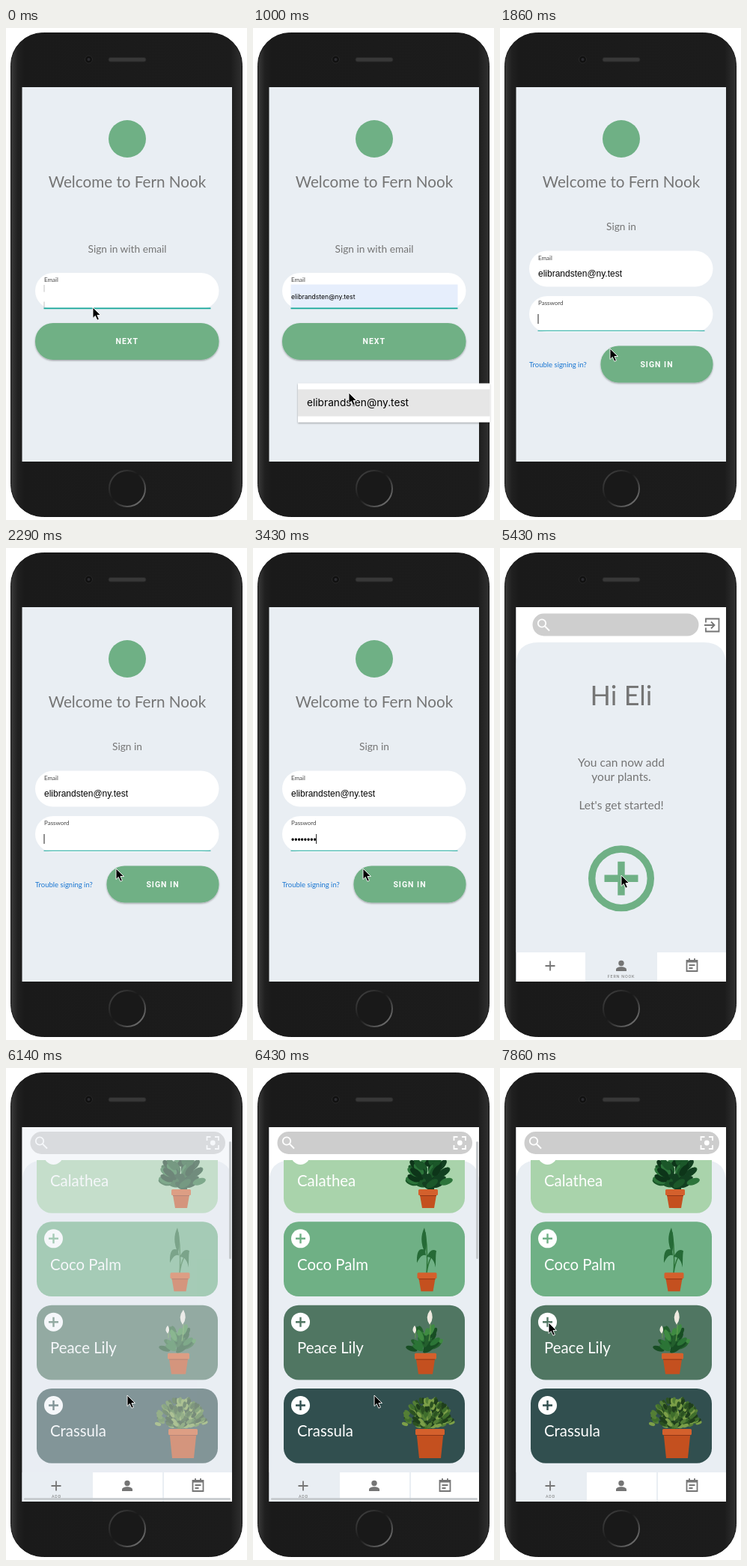
Animation of 322 by 657 pixels, one loop 8000 ms. Source, as an HTML page:

```html
<!DOCTYPE html>
<html lang="en">
<head>
<meta charset="utf-8">
<title>Plant app walkthrough</title>
<style>
  html, body { margin: 0; width: 100%; height: 100%; overflow: hidden; background: #fff; }
  svg { display: block; width: 100%; height: 100%; }
  text { font-family: Lato, sans-serif; fill: #757575; }
  .mid { text-anchor: middle; }
  .title { font-size: 20.7px; }
  .sub { font-size: 13.7px; }
  .body { font-size: 15.6px; }
  .label { font-size: 8px; fill: #444; }
  .tab { font: 5.4px Roboto, sans-serif; letter-spacing: .8px; }
  .button { font: bold 10.5px Roboto, sans-serif; letter-spacing: 1px; fill: #fff; }
  .input { font: 12px "Liberation Sans", sans-serif; fill: #000; }
  .preview { font: 8.6px Inter, sans-serif; fill: #000; }
  .option { font: 13.7px Inter, sans-serif; fill: #000; }
  .card { font-size: 20.4px; fill: #fff; }
  .icon { fill: none; stroke: #757575; stroke-width: 1.8; }
  .white { stroke: #fff; }
</style>
</head>
<body>
<svg viewBox="0 0 322 657">
  <defs>
    <linearGradient id="shell">
      <stop offset="0" stop-color="#3a3a3a"/>
      <stop offset=".03" stop-color="#202020"/>
      <stop offset=".06" stop-color="#1a1a1a"/>
      <stop offset=".95" stop-color="#1c1c1c"/>
      <stop offset="1" stop-color="#303030"/>
    </linearGradient>
    <linearGradient id="ring" x1="0" y1="0" x2="1" y2="1">
      <stop offset="0" stop-color="#4a4a4a"/>
      <stop offset=".45" stop-color="#191919"/>
      <stop offset="1" stop-color="#858585"/>
    </linearGradient>
    <filter id="shadow" x="-10%" y="-20%" width="120%" height="150%">
      <feDropShadow dx="0" dy="1.2" stdDeviation="1.2" flood-opacity=".35"/>
    </filter>
    <clipPath id="screen"><path d="M21.5 79H302V579H21.5Z"/></clipPath>
    <clipPath id="scroller"><path d="M21.5 123H302V540H21.5Z"/></clipPath>
  </defs>
  <rect x="6.5" y="6.5" width="309" height="646" rx="43" fill="url(#shell)" stroke="#151515"/>
  <circle cx="110.5" cy="42" r="5" fill="#111" stroke="#292929"/>
  <circle cx="110.5" cy="42" r="2" fill="#2c2c30"/>
  <rect x="137" y="39.5" width="50" height="5.5" rx="2.7" fill="#383838" stroke="#292929"/>
  <circle cx="162" cy="615" r="24" fill="#191919" stroke="url(#ring)" stroke-width="2"/>
  <g clip-path="url(#screen)">
    <path d="M21 79H302V579H21Z" fill="#e9eef3"/>
    <g id="scenes"></g>
  </g>
  <g id="dropdown">
    <path d="M60 474.5H316.5V526.5H60Z" fill="#fff" filter="url(#shadow)"/>
    <path id="hover" d="M60 482.5H316.5V518.5H60Z" fill="#e6e6e6"/>
    <text id="option" class="option" x="72" y="505"></text>
  </g>
  <path id="cursor" d="M0 0V14.5L3.3 11.4L5.9 17.2L8.4 16.1L5.9 10.5H10.5Z" stroke="#fff" stroke-width=".9"/>
</svg>
<script>
const LOOP = 8000;
const EMAIL = 'elibrandsten@ny.test';
const APP = 'Fern Nook';
const GREEN = '#6fb085';
const $ = id => document.getElementById(id);

let seed = 7;
const random = () => (seed = seed * 16807 % 2147483647) / 2147483647;

const text = (cls, x, y, content, extra = '') => `<text class="${cls}" x="${x}" y="${y}" ${extra}>${content}</text>`;
const rect = (x, y, w, h, r, fill, extra = '') =>
  `<rect x="${x}" y="${y}" width="${w}" height="${h}" rx="${r}" fill="${fill}" ${extra}/>`;
const icon = (d, cls = '', extra = '') => `<path class="icon ${cls}" d="${d}" ${extra}/>`;
const plus = (x, y, r, extra = '') => icon(`M${x - r} ${y}h${2 * r}M${x} ${y - r}v${2 * r}`, '', extra);
const scene = (id, content) => `<g id="${id}">${content}</g>`;

const button = (x, y, w, label) => rect(x, y, w, 49, 24, GREEN, 'filter="url(#shadow)"')
  + text('button mid', x + w / 2, y + 28, label);
const field = (y, label) => rect(39, y, 245.5, 48, 24, '#fff') + text('label', 51, y + 12, label);
const magnifier = (x, y) => icon(`M${x + 3} ${y + 3}l6 6`, 'white', 'stroke-width="2.2"')
  + `<circle class="icon white" cx="${x - 1}" cy="${y - 1}" r="5.2"/>`;

const header = `<circle cx="162" cy="148" r="25" fill="${GREEN}"/>` + text('title mid', 162, 213, `Welcome to ${APP}`);

function tabs(active) {
  const edges = active ? [22, 114, 210, 302] : [22, 116, 211, 302];
  let out = '<path d="M21 540H302V579H21Z" fill="#e9eef3"/>';
  for (let i = 0; i < 3; i++)
    if (i !== active) out += rect(edges[i], 540, edges[i + 1] - edges[i] - (active || i > 1 ? 0 : 2), 39, 0, '#fff');
  return out + plus(67, 558, 6.5)
    + '<path d="M155 565v-2c0-5 14-5 14 0v2Z" fill="#757575"/><circle cx="162" cy="554.5" r="3.7" fill="#757575"/>'
    + icon('M249.5 551h14v14h-14ZM249 552.5h15M253 548v3M260 548v3M252.5 557h8M252.5 561h5')
    + text('tab mid', active ? 162 : 67.5, 574, active ? APP.toUpperCase() : 'ADD');
}

// Scatters leaves in a half-ellipse above the base, each pointing outwards.
function foliage(x, y, count, spread, height, w, h, colors) {
  let out = '';
  for (let i = 0; i < count; i++) {
    const angle = (random() - .5) * 2.9, r = Math.sqrt(random());
    const cx = x + Math.sin(angle) * r * spread, cy = y - Math.cos(angle) * r * height;
    out += `<ellipse rx="${w}" ry="${h}" fill="${colors[i % colors.length]}"
      transform="translate(${cx} ${cy}) rotate(${angle * 50})"/>`;
  }
  return out;
}

const pot = (x, rim, half, bottom) =>
  `<path d="M${x - half + 1.5} ${rim + 5}H${x + half - 1.5}L${x + half - 5} ${bottom}H${x - half + 5}Z" fill="#c4501f"/>`
  + rect(x - half, rim, half * 2, 8, 1.5, '#d4602c')
  + `<path d="M${x - half + 2} ${rim + 8.5}H${x + half - 2}" stroke="#8f3515"/>`;

const palm = '<g fill="none" stroke="#2c7439" stroke-width="1.5"><path d="M232 70Q234 40 230 14M232 68Q235 48 243 40"/></g>'
  + '<g fill="#256a36"><path d="M229 8Q221 24 230 42Q234 24 229 8ZM230 38Q218 32 219 55Q225 42 231 45Z'
  + 'M232 47Q238 34 245 39Q244 43 244 61Q241 46 232 47Z"/></g>';
const lily = foliage(230, 62, 34, 19, 34, 3.3, 8, ['#174d23', '#2b7436', '#3f8b42', '#235f2d'])
  + '<path d="M235 48Q238 35 237 25M217 44V36" stroke="#66a04f" fill="none"/>'
  + '<path d="M237 6Q229 16 236 26Q243 17 237 6ZM216 27Q211 33 216 38Q220 33 216 27Z" fill="#eee9df"/>';

const plants = [
  { name: 'Calathea', y: 94, color: '#a9d3ab',
    art: foliage(235, 64, 42, 24, 46, 4.3, 9, ['#0d3519', '#1b5729', '#123f20', '#2c743a']) + pot(234, 68, 13, 93) },
  { name: 'Coco Palm', y: 205.3, color: GREEN, art: palm + pot(232.5, 68, 13, 93) },
  { name: 'Peace Lily', y: 316.7, color: '#507662', art: lily + pot(230.5, 64, 14.5, 92) },
  { name: 'Crassula', y: 428, color: '#314f4f',
    art: foliage(233, 52, 190, 33, 39, 2.3, 4.3, ['#2c5221', '#547f35', '#7c9f48', '#1f3f1b', '#3f6e2c'])
      + pot(236.5, 54, 19.5, 93) },
];

const card = ({ name, y, color, art }) => `<g transform="translate(0 ${y})">
  ${rect(41, 0, 242, 99.7, 20, color)}
  <circle cx="63.5" cy="22.5" r="12.5" fill="#fff"/>
  ${plus(63.5, 22.5, 6.5, `style="stroke:${color};stroke-width:2.4"`)}
  ${text('card', 59, 64.3, name)}${art}</g>`;

const body = top => '<path d="M21 79H302V540H21Z" fill="#fff"/>'
  + `<path d="M21.5 540V${top + 30}q0-30 30-30H272q30 0 30 30V540Z" fill="#e9eef3"/>`;

$('scenes').innerHTML =
  scene('login', header + text('sub mid', 162, 300, 'Sign in with email') + field(327, 'Email')
    + '<path id="emailCaret" d="M51 343v9.5M51 365.5v8" stroke="#bbb" stroke-width=".9"/>'
    + `<g id="filled">${rect(50.5, 342.5, 223, 31, 0, '#e6eefc')}${text('preview', 51, 361.5, EMAIL)}</g>`
    + '<path d="M50.5 374.3H273.5" stroke="#13a598" stroke-width="1.8"/>'
    + button(39, 394, 245.5, 'NEXT'))
  + scene('password', header + text('sub mid', 162, 269.5, 'Sign in') + field(297.5, 'Email')
    + text('input', 51, 332, EMAIL) + field(358, 'Password') + text('input', 51, 394, '', 'id="dots"')
    + '<path id="caret" stroke="#222" stroke-width="1"/>'
    + '<path d="M50.5 404.3H273.5" stroke="#13a598" stroke-width="1.1"/>'
    + text('', 39, 452.5, 'Trouble signing in?', 'style="font-size:9.5px;fill:#1976d2"')
    + button(134.5, 424.5, 150, 'SIGN IN'))
  + scene('home', '<g id="homeBody">' + body(126) + rect(43.5, 87.5, 222, 30, 15, '#cecece') + magnifier(57, 101.5)
    + icon('M275 99.5v-5h17.5v17h-17.5v-5M273 103h13M282 98.5l4.5 4.5l-4.5 4.5')
    + text('mid', 162, 210, 'Hi Eli', 'style="font-size:36px"')
    + text('body mid', 162, 292, 'You can now add') + text('body mid', 162, 311, 'your plants.')
    + text('body mid', 162, 348.5, "Let's get started!")
    + `<circle cx="162" cy="441.3" r="39.3" fill="none" stroke="${GREEN}" stroke-width="9.4"/>`
    + plus(162, 441.3, 22.5, `style="stroke:${GREEN};stroke-width:9.4"`) + '</g>' + tabs(1))
  + scene('list', '<g id="listBody">' + body(123)
    + `<g clip-path="url(#scroller)">${plants.map(card).join('')}</g>`
    + rect(32.5, 85, 260.5, 30, 15, '#cdcdcd') + magnifier(46, 98.5)
    + icon('M268.5 97v-5h5M279 92h5v5M284 103v5h-5M273.5 108h-5v-5', 'white')
    + '<circle cx="276.3" cy="100" r="3.4" fill="#fff"/></g>' + tabs(0)
    + '<g id="scrollbars">' + rect(298, 98, 3, 157, 1.5, '#c4c8cb') + rect(24, 574.3, 276, 2.5, 1.2, '#c4c8cb') + '</g>');
$('option').textContent = EMAIL;

const clamp = v => Math.min(1, Math.max(0, v));
const ramp = (t, start, end) => clamp((t - start) / (end - start));
const show = (id, visible) => $(id).setAttribute('display', visible ? 'inline' : 'none');

// Pointer stops: time, x, y
const stops = [
  [0, 116, 373], [350, 116, 373], [1000, 128, 487], [1150, 128, 487], [1700, 147, 428], [3500, 147, 428],
  [4100, 186, 447], [4640, 186, 447], [5430, 162, 437], [7070, 162, 437], [7760, 65, 340], [LOOP, 65, 340],
];

function pointer(t) {
  const i = stops.findIndex(stop => stop[0] > t);
  const [t0, x0, y0] = stops[i - 1], [t1, x1, y1] = stops[i];
  const k = ramp(t, t0, t1), ease = k * k * (3 - 2 * k);
  return [x0 + (x1 - x0) * ease, y0 + (y1 - y0) * ease];
}

function draw(t) {
  const [x, y] = pointer(t);
  const picked = t >= 860;
  show('login', t < 1860);
  show('password', t >= 1860 && t < 3570);
  show('home', t >= 3570 && t < 5990);
  show('list', t >= 5990);
  show('dropdown', t >= 280 && t < 1140);
  show('hover', picked);
  show('filled', picked);
  show('emailCaret', !picked);

  const typed = Math.floor(clamp((t - 2287) / 1143) * 8);
  $('dots').textContent = '•'.repeat(typed);
  $('caret').setAttribute('d', `M${51 + typed * 4.2} 382v13`);

  $('homeBody').setAttribute('opacity', ramp(t, 3510, 3870));
  $('listBody').setAttribute('opacity', ramp(t, 5940, 6300));
  $('scrollbars').setAttribute('opacity', 1 - ramp(t, 6500, 6900));
  $('cursor').setAttribute('transform', `translate(${x} ${y})`);
}

const start = performance.now();
function tick() {
  draw((performance.now() - start) % LOOP);
  requestAnimationFrame(tick);
}
tick();
</script>
</body>
</html>
```
